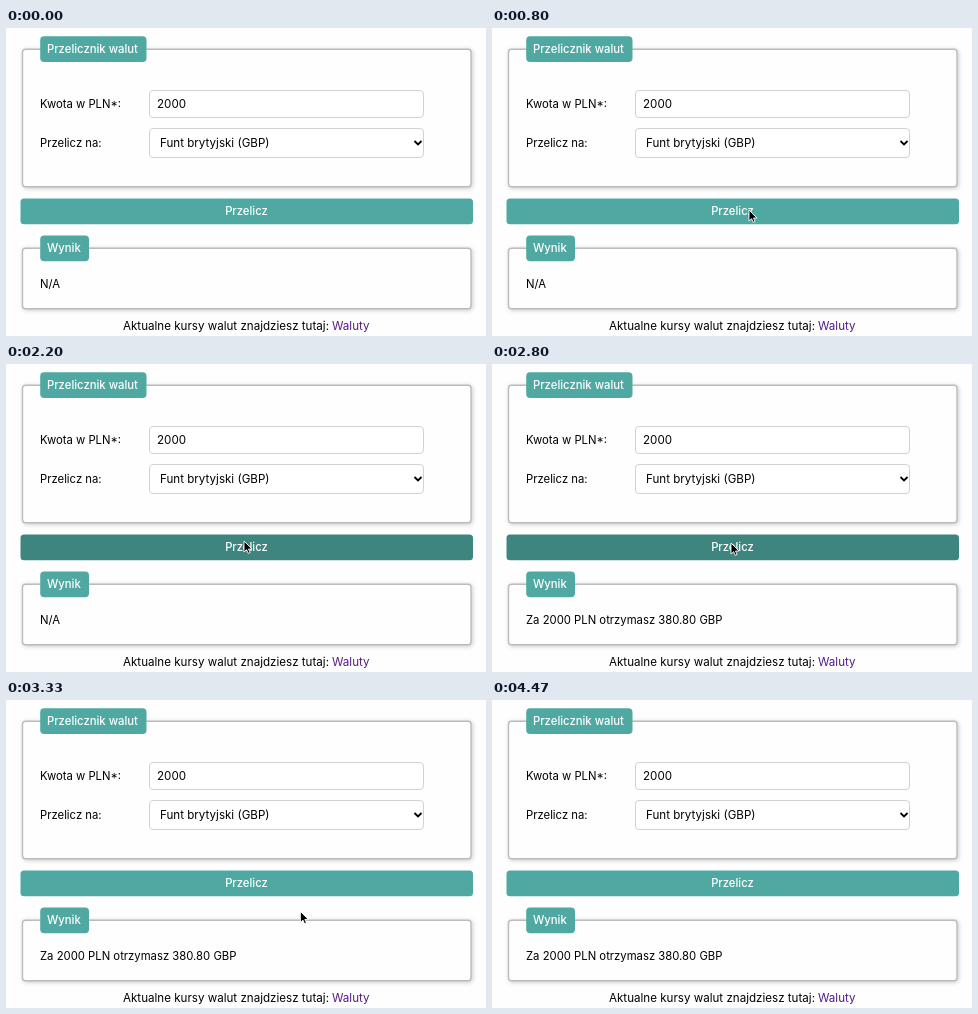
Recreate the animation shown at these times as an HTML page. Size 480 by 308 pixels, loop 4.59 s.

```html
<!DOCTYPE html>
<html lang="pl">
<head>
<meta charset="utf-8">
<title>Przelicznik walut</title>
<style>
  html, body { margin: 0; width: 100%; height: 100%; overflow: hidden; background: #fefefe; }
  svg { display: block; width: 480px; height: 308px; font: 11.3px Inter, sans-serif; }
  .panel { fill: #fefefe; stroke: #bcbcbc; stroke-width: 1.4; filter: drop-shadow(1px 1px 2px #0003); }
  .field { fill: #fff; stroke: #d2d2d2; }
  .teal { fill: #4fa9a2; }
  .teal.hover { fill: #3e857f; }
  .light { fill: #fff; font-weight: 550; }
  .wide { font-size: 11.6px; }
  .link { fill: #551a8b; }
</style>
</head>
<body>
<svg viewBox="0 0 480 308">
  <rect class="panel" x="16.5" y="21.2" width="448.5" height="137.5" rx="3"/>
  <rect class="teal" x="34.2" y="8.3" width="106.3" height="25.7" rx="4"/>
  <text class="light" x="41" y="25">Przelicznik walut</text>

  <text x="34" y="79.5">Kwota w PLN*:</text>
  <rect class="field" x="143.5" y="62.5" width="274" height="27" rx="3.5"/>
  <text class="wide" x="151" y="79.5">2000</text>

  <text x="34" y="119">Przelicz na:</text>
  <rect class="field" x="143.5" y="100.5" width="274" height="29" rx="3.5"/>
  <text class="wide" x="154" y="119">Funt brytyjski (GBP)</text>
  <path d="M408.5 113l3.5 3.5 3.5-3.5" fill="none" stroke="#000" stroke-width="1.8"/>

  <rect id="button" class="teal" x="14.5" y="170.5" width="452.5" height="25.8" rx="3.5"/>
  <text class="light" x="240.5" y="187" text-anchor="middle">Przelicz</text>

  <rect class="panel" x="16.5" y="220.2" width="448.5" height="60.5" rx="3"/>
  <rect class="teal" x="34.2" y="207.6" width="48.8" height="25.7" rx="4"/>
  <text class="light" x="41" y="224.3">Wynik</text>
  <text id="result" x="34" y="260">N/A</text>

  <text class="wide" x="117" y="302">Aktualne kursy walut znajdziesz tutaj:</text>
  <text class="wide link" x="326" y="302">Waluty</text>

  <path id="cursor" d="M0 0V11L2.6 8.7 4.2 12.3 6.1 11.5 4.5 8H8Z" stroke="#fff" stroke-width=".9"/>
</svg>
<script>
  const LOOP = 4590, STEP = 200 / 3;
  const button = document.getElementById('button');
  const result = document.getElementById('result');
  const cursor = document.getElementById('cursor');

  // Pointer waypoints: time, x, y
  const route = [
    [66, 468, 288], [530, 270, 180], [800, 257, 182], [1860, 257, 182],
    [2200, 238, 177], [2330, 239, 179], [2800, 239, 179], [3266, 274, 194],
    [3330, 295, 211], [3800, 250, 242], [4130, 275, 226], [4330, 317, 203],
    [4400, 402, 214], [4467, 488, 226]
  ];

  const between = (t, start, end) => t >= start && t < end;

  function pointerAt(t) {
    const i = route.findIndex(point => point[0] > t);
    if (i < 0) return route[route.length - 1].slice(1);
    const [t0, x0, y0] = route[Math.max(i - 1, 0)];
    const [t1, x1, y1] = route[i];
    const p = Math.max(0, (t - t0) / (t1 - t0 || 1));
    const eased = 1 - (1 - p) ** 2;
    return [x0 + (x1 - x0) * eased, y0 + (y1 - y0) * eased];
  }

  function draw(now) {
    // The pointer is sampled 15 times per second
    const t = Math.floor((now % LOOP + 4) / STEP) * STEP;
    const [x, y] = pointerAt(t);
    cursor.setAttribute('transform', `translate(${x} ${y})`);
    cursor.style.display = between(t, 66, 4460) ? '' : 'none';
    button.classList.toggle('hover', between(t, 1930, 3320));
    const text = t < 2320 ? 'N/A' : 'Za 2000 PLN otrzymasz 380.80 GBP';
    if (result.textContent !== text) result.textContent = text;
  }

  const start = performance.now();
  function tick() {
    draw(performance.now() - start);
    requestAnimationFrame(tick);
  }
  tick();
</script>
</body>
</html>
```
